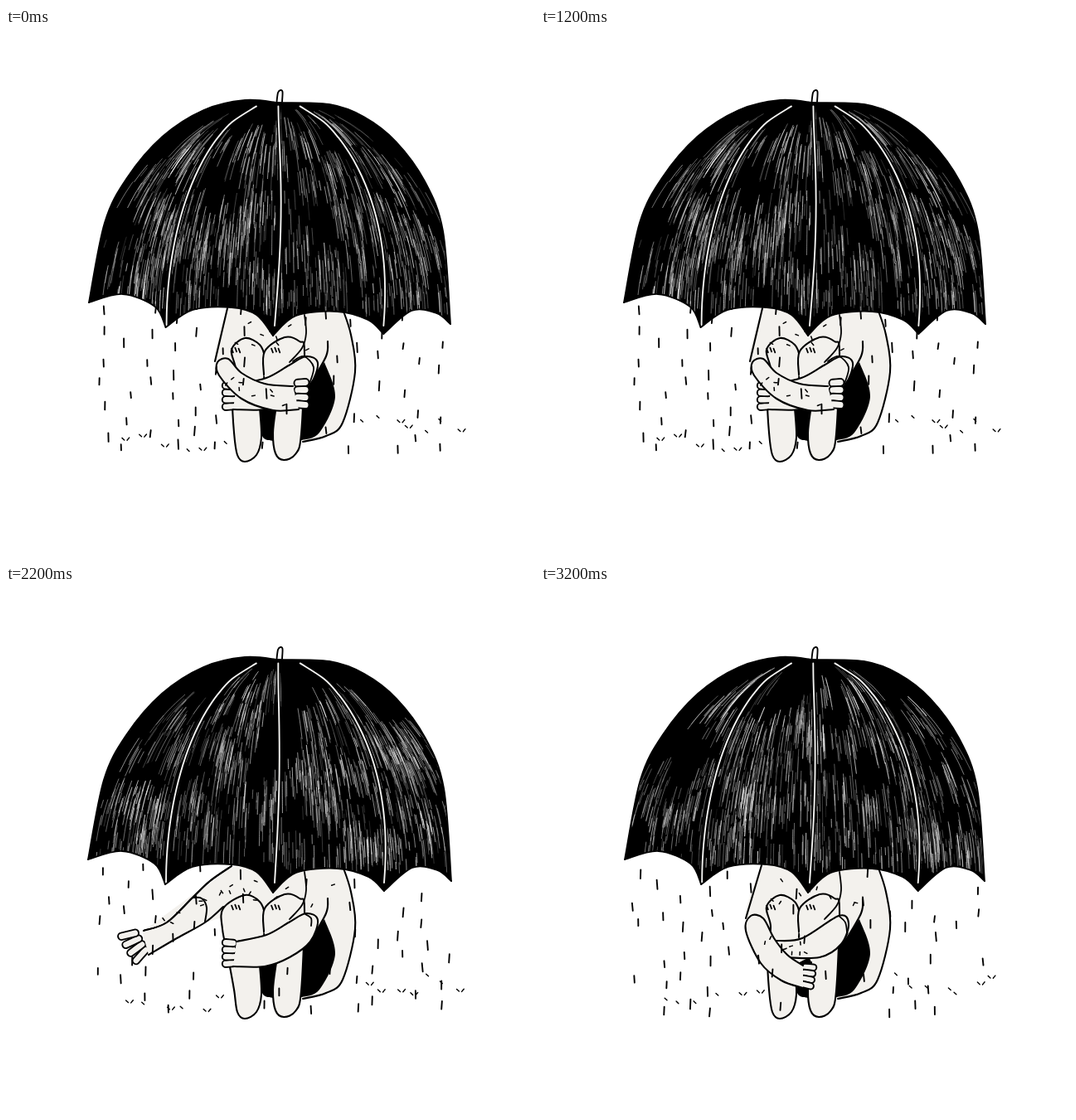
Write an HTML page with a canvas that moves like this. It is 638 px wide and 638 px high and loops after 3.4 s.

```html
<!DOCTYPE html>
<html lang="en">
<head>
<meta charset="utf-8">
<title>Umbrella in the rain</title>
<style>
  html, body { margin: 0; width: 100%; height: 100%; overflow: hidden; background: #fff; }
  canvas { display: block; }
</style>
</head>
<body>
<canvas id="stage" width="638" height="638"></canvas>
<script>
const ctx = document.getElementById('stage').getContext('2d');
const SKIN = '#f3f1ed', INK = '#000', STEP = 200, COUNT = 17;

function random(seed) {
  return () => {
    seed = (seed + 0x6D2B79F5) | 0;
    let r = Math.imul(seed ^ (seed >>> 15), 1 | seed);
    r = (r + Math.imul(r ^ (r >>> 7), 61 | r)) ^ r;
    return ((r ^ (r >>> 14)) >>> 0) / 4294967296;
  };
}

// Smooth curve through the points of each run; corners where runs meet.
function trace(...runs) {
  ctx.beginPath();
  runs.forEach((p, k) => {
    const n = p.length / 2;
    const at = (i, a) => p[2 * Math.max(0, Math.min(n - 1, i)) + a];
    if (k) ctx.lineTo(p[0], p[1]); else ctx.moveTo(p[0], p[1]);
    for (let i = 0; i < n - 1; i++) {
      const c = [0, 1].map(a => at(i, a) + (at(i + 1, a) - at(i - 1, a)) / 6);
      const d = [0, 1].map(a => at(i + 1, a) - (at(i + 2, a) - at(i, a)) / 6);
      ctx.bezierCurveTo(...c, ...d, at(i + 1, 0), at(i + 1, 1));
    }
  });
}

function fill(color, ...runs) { trace(...runs); ctx.fillStyle = color; ctx.fill(); }

function line(width, points, color = INK) {
  trace(points);
  ctx.lineWidth = width;
  ctx.strokeStyle = color;
  ctx.stroke();
}

function limb(points) { fill(SKIN, points); line(2.1, points); }

function dash(x, y, dx, dy, w) { line(w, [x - dx, y - dy, x + dx, y + dy]); }

// Four fingers side by side, fanned out by spread.
function hand(x, y, angle, gap, length, spread = 0.06) {
  for (let k = -1.5; k < 2; k++) {
    const bx = x - Math.sin(angle) * k * gap, by = y + Math.cos(angle) * k * gap;
    const a = angle + k * spread;
    const finger = [bx, by, bx + Math.cos(a) * length, by + Math.sin(a) * length];
    line(gap + 2.4, finger);
    line(gap - 1.4, finger, SKIN);
  }
}

function rain(v) {
  const rnd = random(11 + v * 5);
  const shift = [0, 13, 6][v];
  for (let col = 0; col < 16; col++) {
    for (let row = 0; row < 6; row++) {
      const x = 118 + col * 27.4 + (rnd() - 0.5) * 16;
      const y = 340 + row * 30 + (col % 2) * 14 + (rnd() - 0.5) * 12 + shift;
      const onBody = x > 255 && x < 418;
      const len = 3.4 + rnd() * 2.4;
      if (rnd() < (onBody ? 0.35 : 0.7) && y < 517) dash(x, y, rnd() - 0.5, len, 1.9);
    }
  }
  for (let i = 0; i < 13; i++) {
    const right = i > 5;
    const x = right ? 430 + (i - 6) * 18 + rnd() * 12 : 142 + i * 23 + rnd() * 12;
    const y = right ? 467 + rnd() * 28 : 489 + rnd() * 28;
    dash(x - 3, y, 1.4, 1.3, 1.4);
    if (rnd() < 0.65) dash(x + 3, y, -1.3, 1.6, 1.4);
  }
}

function flecks(v, x, y, w, h, slope, count) {
  const rnd = random(70 + v);
  for (let i = 0; i < count; i++) {
    const px = rnd(), a = rnd() * 3;
    dash(x + px * w, y + px * slope + rnd() * h, 1.9 * Math.cos(a), 1.9 * Math.sin(a), 1.5);
  }
}

function body(pose) {
  const back = [405, 336, 416, 370, 421, 415, 406, 476, 386, 492, 358, 499];
  const front = { out: [310, 465, 290, 336], low: [280, 430, 247, 402, 266, 338],
    hug: [280, 430, 252, 402, 267, 338] }[pose];
  fill(SKIN, back, front);
  line(2.1, back);
  if (pose !== 'out') line(2.1, front.slice(2));
  fill(INK, [384, 403, 397, 445, 378, 488, 357, 497], [322, 498, 309, 492, 306, 458], [360, 430, 376, 414]);
  limb([388, 378, 386, 396, 366, 431]);
}

function leg(points, x) {
  limb(points);
  for (let i = 0; i < 3; i++) dash(x + i * 4.2, 389 - (i === 1), 0.9, 2.4, 1.8);
}

function legs(pose) {
  const knee = pose === 'out' ? [268, 450, 261, 415, 262, 390] : [273, 445, 277, 412, 272, 388];
  leg([306, 458, 308, 494, 302, 515, 288, 523, 279, 515, 275, 488, ...knee,
    288, 374, 306, 382, 312, 398, 311, 425], 273);
  leg([311, 418, 312, 390, 336, 373, 354, 378, 360, 391, 356, 490,
    349, 514, 335, 521, 325, 513, 322, 488, 326, 455], 321);
  line(1.8, [360, 346, 362, 368, 357, 386, 342, 403]);
}

function nearArm(pose) {
  if (pose === 'low') {
    limb([283, 429, 315, 426, 359, 399, 371, 408, 362, 433, 336, 449, 290, 449]);
    line(1.7, [359, 399, 367, 407, 369, 419]);
    return;
  }
  hand(274, 444, Math.PI, 8, 9);
  limb([278, 430, 314, 422, 341, 407, 362, 396, 376, 404, 367, 430, 342, 449, 312, 460, 274, 460]);
  line(1.8, pose === 'out' ? [361, 397, 368, 402, 368, 411] : [346, 402, 359, 396, 371, 409, 366, 429]);
}

function farArm(pose, v) {
  if (pose === 'hug') {
    hand(352, 441, 0, 8.5, 9);
    limb([346, 432, 312, 429, 284, 416, 268, 399, 255, 403, 257, 419, 284, 447, 322, 461, 353, 460]);
  } else if (pose === 'low') {
    hand(317, 471, 0.15, 7, 10);
    limb([316, 459, 297, 446, 281, 426, 268, 402, 253, 399, 247, 417, 265, 456, 290, 477, 316, 486]);
  } else {
    fill(SKIN, [270, 341, 224, 378, 170, 430, 240, 407], [300, 390, 305, 335]);
    hand(162, 430, 2.6, 8, 17, 0.2);
    limb([166, 417, 194, 407, 224, 378, 246, 357, 272, 339]);
    fill(SKIN, [164, 417, 194, 407, 262, 350, 262, 388], [240, 407, 206, 426, 172, 446]);
    line(2.1, [262, 388, 240, 407, 206, 426, 172, 446]);
    line(2.1, [166, 417, 194, 407, 224, 378, 246, 357, 272, 339]);
    line(2, [225, 377, 236, 378, 242, 389, 240, 406]);
    flecks(v + 9, 185, 405, 90, 12, -47, 9);
  }
}

const DOME = [
  [99, 331, 118, 235, 145, 181, 188, 131, 238, 99, 288, 87, 328, 90],
  [328, 90, 390, 92, 432, 107, 471, 137, 506, 185, 528, 245, 537, 357],
  [537, 357, 520, 344, 490, 341, 456, 369],
  [456, 369, 437, 352, 400, 342, 350, 347, 322, 371],
  [322, 371, 302, 346, 272, 337, 225, 340, 192, 361],
  [192, 361, 179, 336, 140, 321, 99, 331]
];

// A point on the seam that ends dx from the middle of the rim.
function seam(dx, t) {
  return [329 + dx * Math.sqrt(t * (2 - t)), 89 + 270 * t];
}

// Pale pen strokes that follow the seams.
function hatch(v) {
  const rnd = random(40 + v);
  for (let patch = 0; patch < 200; patch++) {
    const dx = 444 * (rnd() - 0.5), t = 0.04 + rnd() * 0.92, glow = 0.12 + 0.4 * rnd();
    if (rnd() > Math.sqrt(t * (2 - t))) continue;
    for (let i = 0; i < 9; i++) {
      const sx = dx + (rnd() - 0.5) * 36, from = t + (rnd() - 0.5) * 0.1;
      const to = from + 0.03 + rnd() * 0.12;
      if (from < 0.03 || to > 0.96) continue;
      const points = [from, (from + to) / 2, to].flatMap(s => seam(sx, s));
      line(0.5 + rnd() * 0.55, points, `rgba(255,255,255,${glow + rnd() * 0.35})`);
    }
  }
}

function rib(dx, bulge) {
  const points = [];
  for (let t = 0.02; t < 1.02; t += 0.07) {
    const [x, y] = seam(dx, t);
    points.push(x + bulge * Math.sin(Math.PI * t), y);
  }
  line(5, points);
  line(1.9, points, '#f4f4f2');
}

function umbrella(v) {
  const scale = 1 - [2, 4, 0][v] / 438;
  ctx.save();
  ctx.translate(318 * (1 - scale), 0);
  ctx.scale(scale, 1);
  fill(INK, ...DOME);
  ctx.save();
  ctx.clip();
  hatch(v);
  rib(-136, 0);
  rib(-5, 7 - v);
  rib(127, 7);
  ctx.restore();
  DOME.forEach(run => line(1.8, run));
  ctx.restore();
  const tip = [326.5, 89, 328, 78, 331, 75, 333.5, 77, 333, 89];
  fill('#fff', tip);
  line(1.9, tip);
}

function draw(step) {
  const v = step % 3;
  const pose = step === 7 || step === 16 ? 'low' : step < 7 ? 'hug' : 'out';
  ctx.fillStyle = '#fff';
  ctx.fillRect(0, 0, 638, 638);
  ctx.lineCap = ctx.lineJoin = 'round';
  body(pose);
  if (pose === 'out') {
    farArm(pose, v);
    legs(pose);
    nearArm(pose);
  } else {
    legs(pose);
    nearArm(pose);
    farArm(pose, v);
    flecks(v, 262, 415, 75, 22, 20, 8);
  }
  flecks(v + 3, 270, 352, 125, 30, 8, 9);
  rain(v);
  umbrella(v);
}

const start = performance.now();
let shown = -1;
function tick() {
  const step = Math.floor((performance.now() - start) / STEP) % COUNT;
  if (step !== shown) draw(shown = step);
  requestAnimationFrame(tick);
}
tick();
</script>
</body>
</html>
```
